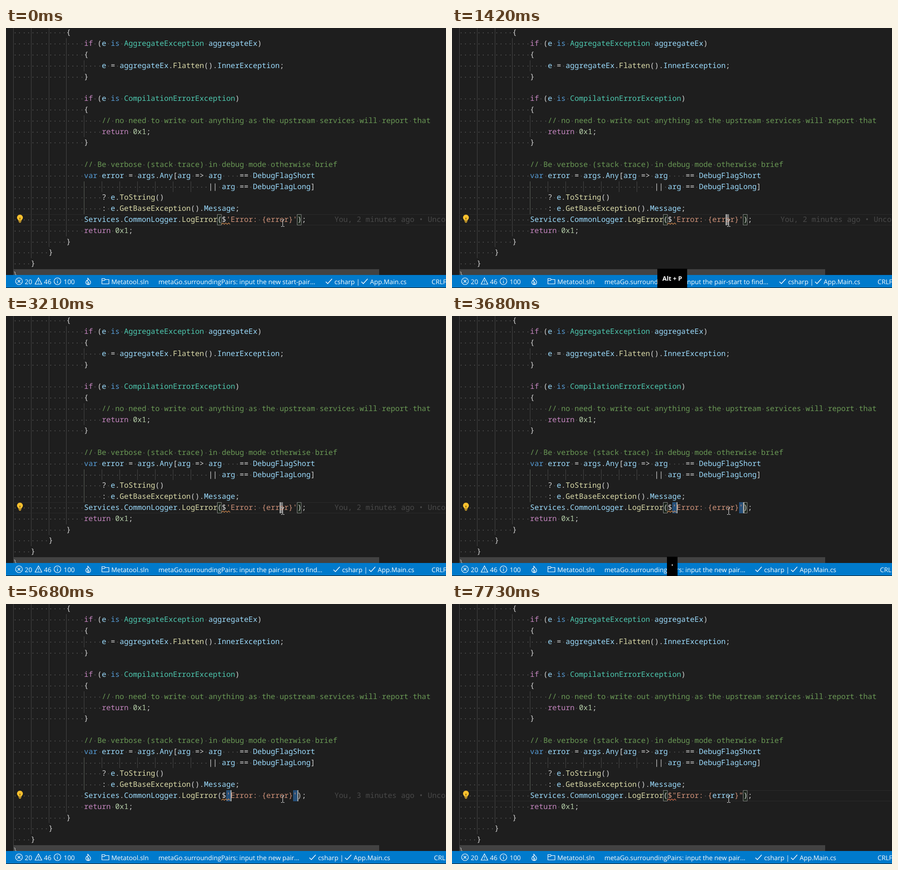
An HTML page with a canvas that plays this animation: 915 by 539 pixels, repeating every 8 s.

```html
<!DOCTYPE html>
<html lang="en">
<head>
<meta charset="utf-8">
<title>Surrounding pairs</title>
<style>
html, body { margin: 0; width: 100%; height: 100%; overflow: hidden; background: #1e1e1e; }
canvas { display: block; }
</style>
</head>
<body>
<canvas id="stage" width="915" height="539"></canvas>
<script>
const c = document.getElementById('stage').getContext('2d');
const LOOP = 8000, X0 = 14.5, Y0 = -1.6, CW = 9.24, LH = 22.8, ACTIVE = 17;
const CODE = '500 15.4px "Noto Sans Mono", monospace';
const UI = '13.4px "Open Sans", sans-serif';
const KEY = 'bold 13px "Open Sans", sans-serif';
const PLAIN = '#d4d4d4', NAME = '#9cdcfe', STRING = '#ce9178';

// Each line: indent column, then code
const lines = [
  [12, '{'],
  [16, 'if (e is AggregateException aggregateEx)'],
  [16, '{'],
  [20, 'e = aggregateEx.Flatten().InnerException;'],
  [16, '}'],
  [0, ''],
  [16, 'if (e is CompilationErrorException)'],
  [16, '{'],
  [20, '// no need to write out anything as the upstream services will report that'],
  [20, 'return 0x1;'],
  [16, '}'],
  [0, ''],
  [16, '// Be verbose (stack trace) in debug mode otherwise brief'],
  [16, 'var error = args.Any[arg => arg    == DebugFlagShort'],
  [44, '|| arg == DebugFlagLong]'],
  [20, '? e.ToString()'],
  [20, ': e.GetBaseException().Message;'],
  [16, 'Services.CommonLogger.LogError('],
  [16, 'return 0x1;'],
  [12, '}'],
  [8, '}'],
  [4, '}'],
  [0, '}']
];

// Capture groups in the order of their colours
const TOKEN = /(\/\/.*)|\b(if|return)\b|\b(is|var)\b|\b(0x1)\b|(\w+(?=\())|((?<!\.)\b\w+Exception\b)|(\w+)|[^\w]/g;
const COLORS = ['#6a9955', '#c586c0', '#569cd6', '#b5cea8', '#dcdcaa', '#4ec9b0', NAME];

const colX = col => X0 + col * CW;
const rowY = row => Y0 + row * LH;
const within = (t, spans) => spans.some(([a, b]) => t >= a && t < b);

function rect(x, y, w, h, color) {
  c.fillStyle = color;
  c.fillRect(x, y, w, h);
}

function label(text, x, y, font, color, align = 'left') {
  c.font = font;
  c.fillStyle = color;
  c.textAlign = align;
  c.fillText(text, x, y);
}

function stroke(d, color = '#fff', width = 1.2) {
  c.strokeStyle = color;
  c.lineWidth = width;
  c.stroke(new Path2D(d));
}

// Writes on the character grid, spaces as dots; returns the next column
function write(text, row, col, color) {
  for (const ch of text) {
    if (ch === ' ') rect(Math.round(colX(col + .5)) - 1, Math.round(rowY(row) + 11), 2, 2, '#464646');
    else label(ch, colX(col), rowY(row) + 16, CODE, color);
    col++;
  }
  return col;
}

function guide(col, from, to, color = '#444') {
  const top = Math.round(rowY(from));
  rect(Math.floor(colX(col) + .6), top, 1, Math.round(rowY(to + 1)) - top, color);
}

function drawGuides() {
  guide(0, 0, 21);
  guide(4, 0, 20);
  guide(8, 0, 19);
  guide(12, 1, 18);
  guide(16, 3, 3);
  guide(16, 8, 9);
  guide(16, 14, 16, '#5a5f58');
  for (let col = 20; col <= 40; col += 4) guide(col, 14, 14);
}

function drawCode() {
  lines.forEach(([indent, text], row) => {
    let col = write(' '.repeat(indent), row, 0, PLAIN);
    for (const m of text.matchAll(TOKEN)) {
      const kind = m.slice(1).findIndex(Boolean);
      col = write(m[0], row, col, COLORS[kind] || PLAIN);
    }
  });
}

function drawString(t) {
  const parsed = t >= 6240, quote = t >= 6160 ? '"' : "'";
  let col = write('$', ACTIVE, 47, parsed ? STRING : PLAIN);
  col = write(quote + 'Error: {', ACTIVE, col, STRING);
  col = write('error', ACTIVE, col, parsed ? NAME : STRING);
  col = write('}' + quote, ACTIVE, col, STRING);
  write(');', ACTIVE, col, PLAIN);
  stroke('M448 407l3-3 3 3 3-3 3 3 3-3 3 3', parsed ? '#d9704f' : '#d08a50');
}

function drawActiveLine(t) {
  const selecting = within(t, [[3680, 6160]]);
  if (selecting) {
    for (const x of [458, 597]) rect(x, 386, 9, 23, '#264f78');
  } else {
    for (const y of [386, 408]) rect(15, y, 900, 1, '#2b2b2b');
  }
  if (within(t, [[1420, 3680]])) rect(571, 386, 5, 23, '#777');
  if (t < 3740 || t >= 6240) {
    for (const x of [439.5, 605.5]) {
      rect(x, 386.5, 8.5, 22, 'rgba(0,100,0,.1)');
      stroke(`M${x} 386.5h8.5v22h-8.5z`, '#888', 1);
    }
  }
  const minutes = t < 3680 ? 2 : within(t, [[3910, 6160]]) ? 3 : 0;
  if (minutes) {
    [...`You, ${minutes} minutes ago • Unco`].forEach((ch, i) =>
      label(ch, 683 + i * CW, 402, CODE, '#494949'));
  }
}

function drawCarets(t) {
  const on = within(t, [[230, 700], [1250, 1740], [2270, 2730], [3210, 4140],
    [4690, 5150], [5680, 6690], [7180, 7730]]);
  if (on) for (const x of t < 3680 ? [569] : [467, 606]) rect(x, 386, 2, 23, '#aeafad');
}

function drawBulb() {
  c.fillStyle = '#fcc02e';
  c.fill(new Path2D('M29 387a6 6 0 0 1 4 10.5l-1 2h-6l-1-2A6 6 0 0 1 29 387z'));
  rect(26, 400, 6, 1.5, '#d9a72b');
  rect(27, 402, 4, 1.5, '#d9a72b');
  rect(28, 393, 2, 4, '#8a6a10');
}

function drawStatus(t) {
  const [prompt, x] = t < 1420 ? ['new start-pair', 683]
    : t < 3680 ? ['pair-start to find', 699] : ['new pair', 649];
  const text = (s, left) => label(s, left, 531, UI, '#fff');
  const check = left => stroke(`M${left} 526l4 4 9-10`, '#fff', 1.4);
  rect(0, 512, 915, 26, '#007acc');
  rect(0, 538, 915, 1, '#1e1e1e');
  stroke('M34 525a7 7 0 1 0-14 0a7 7 0 1 0 14 0M24 522l6 6m0-6l-6 6');
  text('20', 39);
  stroke('M67.5 518l7 13h-14zM67.5 522.5v4m0 1.5v1.5');
  text('46', 79);
  stroke('M114 525a7 7 0 1 0-14 0a7 7 0 1 0 14 0M107 524v5m0-8v1.6');
  text('100', 120);
  stroke('M170 518c1 4 6 5 6 9.5a5 4.5 0 0 1-10 0c0-2 1-3 2-4.5l1.5 2c1-2 1-4 .5-7zM171 526c2 2 2 4 0 5c-2-1-2-3 0-5');
  stroke('M199.5 519.5h5.5l1.5 2h7.5v9h-14.5zM199.5 523.5h5l2-2');
  text('Metatool.sln', 219);
  text(`metaGo.surroundingPairs: input the ${prompt}...`, 317);
  check(x - 18);
  text('csharp |', x);
  check(x + 56);
  text('App.Main.cs', x + 74);
  text('CRLF', within(t, [[3680, 6240]]) ? 890 : 885);
}

function drawKeys(t) {
  const keys = [[1420, 2350, 'Alt + P', 62], [3680, 4600, "'", 22], [6160, 7090, 'Shift + ,', 68]];
  for (const [from, to, text, w] of keys) {
    if (t < from || t >= to) continue;
    rect(458 - w / 2, 499, w, 40, '#000');
    label(text, 458, 523.5, KEY, '#fff', 'center');
  }
}

function draw(t) {
  rect(0, 0, 915, 539, '#1e1e1e');
  drawGuides();
  drawActiveLine(t);
  drawCode();
  drawString(t);
  drawCarets(t);
  drawBulb();
  stroke('M572 397.5h2.5l1 1 1-1h2.5M575.5 398v13M572 411.5h2.5l1-1 1 1h2.5', '#e0e0e0', 1);
  rect(15, 500, 761, 12, 'rgba(121,121,121,.4)');
  drawStatus(t);
  drawKeys(t);
}

c.textRendering = 'geometricPrecision';
const start = performance.now();
function tick() {
  draw((performance.now() - start) % LOOP);
  requestAnimationFrame(tick);
}
tick();
</script>
</body>
</html>
```
